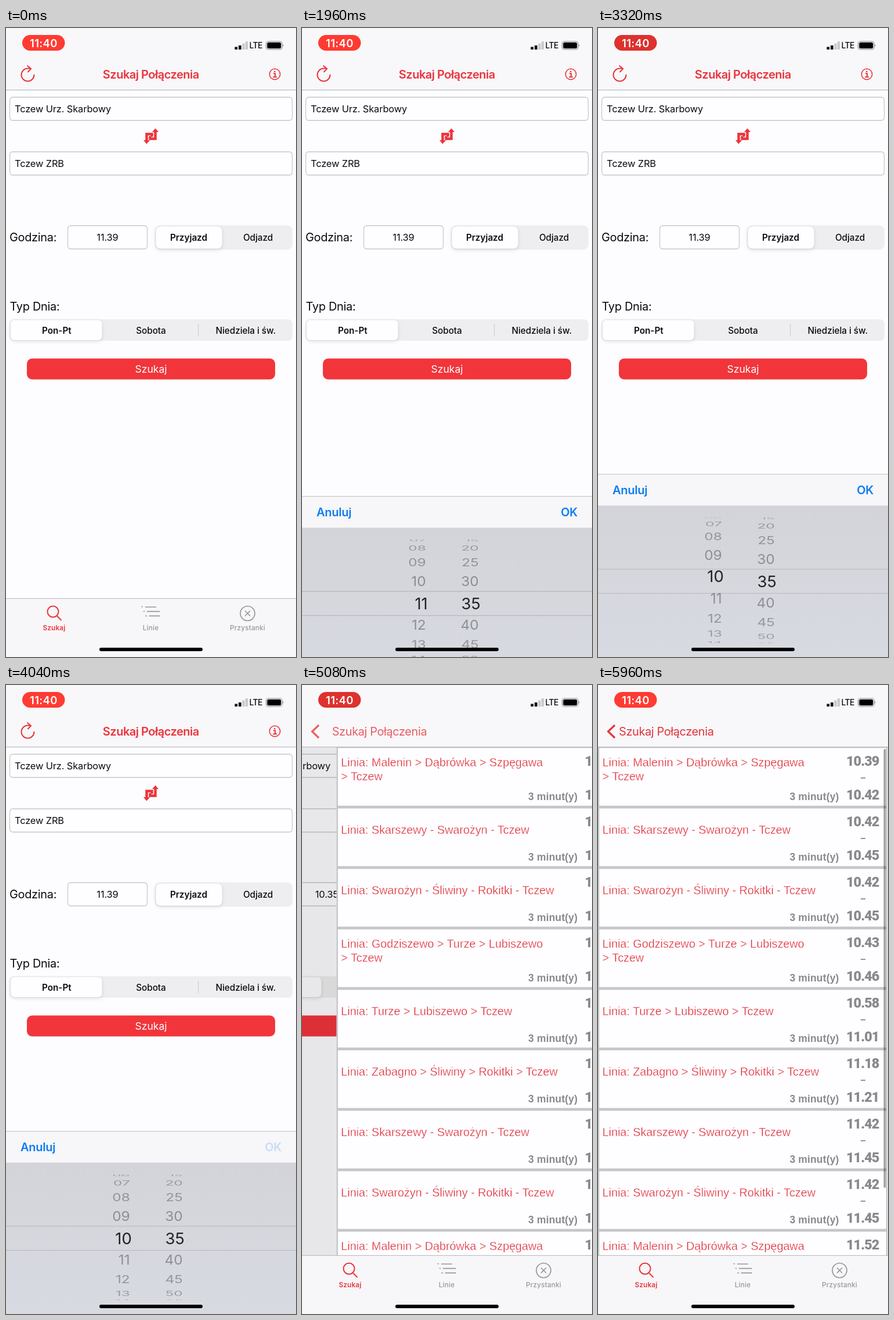
These frames come from a looping animation (500x1082 px, 6 s). An HTML page:

```html
<!DOCTYPE html>
<html lang="pl">
<head>
<meta charset="utf-8">
<title>Szukaj Połączenia</title>
<style>
  html, body { margin: 0; width: 100%; height: 100%; overflow: hidden; background: #fdfcfe; }
  svg { display: block; width: 100vw; height: 100vh; }
  text { font-family: Inter, sans-serif; fill: #0b0b0c; white-space: pre; }
  .mid { text-anchor: middle; }
  .end { text-anchor: end; }
  .field { fill: #fefdff; stroke: #c9c8cc; stroke-width: 1.3; }
  .input { font-size: 16.4px; letter-spacing: -.13px; }
  .label { font-size: 19.9px; letter-spacing: -.28px; }
  .track { fill: #eeedef; }
  .thumb { fill: #fefdff; filter: drop-shadow(0 2px 3px rgba(0,0,0,.13)); }
  .seg { font-size: 15.3px; font-weight: 500; letter-spacing: -.05px; text-anchor: middle; }
  .on { font-weight: 600; }
  .icon { fill: none; stroke: #e8353c; stroke-width: 2; }
  .gray { stroke: #97969a; stroke-width: 1.7; }
  .title { font-size: 20px; font-weight: 600; letter-spacing: -.5px; fill: #ea343c; }
  .back { font-size: 19.9px; letter-spacing: -.36px; fill: #e2343c; }
  .tab { font-size: 11.7px; font-weight: 500; letter-spacing: .22px; text-anchor: middle; fill: #97969a; }
  .tab.on { fill: #ea343c; font-weight: 600; }
  .action { font-size: 19.9px; font-weight: 600; letter-spacing: -.2px; fill: #0a7df2; }
  /* The pale outline thins the strokes to a light weight */
  .line { font: 19.75px "Liberation Sans", sans-serif; fill: #df2932; stroke: #fefdff; stroke-width: .4; }
  .time { font: 900 23.5px Roboto, sans-serif; letter-spacing: -1px; fill: #89888c; }
  .mins { font: 700 17.5px "Liberation Sans", sans-serif; letter-spacing: .15px; fill: #89888c; }
  .cell { fill: #fefdff; stroke: #c6c5c8; stroke-width: 2.4; }
</style>
</head>
<body>
<svg viewBox="0 0 500 1082" preserveAspectRatio="none">
  <defs>
    <clipPath id="band"><rect x="0" y="931" width="500" height="41"/></clipPath>
    <clipPath id="rest"><path d="M0 842H500V931H0ZM0 972H500V1058H0Z"/></clipPath>
    <linearGradient id="tray" x2="0" y2="1">
      <stop offset="0" stop-color="#d3d4d9"/><stop offset="1" stop-color="#d8dae2"/>
    </linearGradient>
  </defs>
  <rect width="500" height="1082" fill="#fdfcfe"/>

  <g id="form">
    <rect class="field" x="6.5" y="119" width="487" height="40" rx="5"/>
    <text class="input" x="15" y="144.5">Tczew Urz. Skarbowy</text>
    <g fill="#ea343c">
      <path d="M242.5 194V182.5H251.5V187M257.5 178V190.5H248.5V186" fill="none" stroke="#ea343c" stroke-width="4.4"/>
      <path d="M237 193H248L242.5 199.5ZM252 179H263L257.5 172.5Z"/>
    </g>
    <rect class="field" x="6.5" y="213" width="487" height="40" rx="5"/>
    <text class="input" x="15" y="238.7">Tczew ZRB</text>

    <text class="label" x="6" y="367">Godzina:</text>
    <rect class="field" x="106.5" y="340" width="137" height="40" rx="5"/>
    <text class="input mid" id="hour" x="175" y="365.5">11.39</text>
    <rect class="track" x="256.5" y="339.5" width="237.5" height="42" rx="9"/>
    <rect class="thumb" x="258.5" y="341.5" width="114" height="38" rx="8"/>
    <text class="seg on" x="315" y="366">Przyjazd</text>
    <text class="seg" x="434.5" y="366">Odjazd</text>

    <text class="label" x="6.5" y="485.5">Typ Dnia:</text>
    <rect class="track" x="6" y="501" width="488" height="37" rx="8"/>
    <rect id="divider" x="331" y="509" width="1.2" height="21" fill="#cfced2"/>
    <rect class="thumb" id="thumb" x="8" y="502.5" width="157.5" height="34.5" rx="7"/>
    <text class="seg" id="week" x="87.3" y="525.5">Pon-Pt</text>
    <text class="seg" id="sat" x="250" y="525.5">Sobota</text>
    <text class="seg" x="413.3" y="525.5">Niedziela i św.</text>

    <rect x="36" y="568.5" width="428" height="36" rx="9" fill="#f1353b"/>
    <text class="mid" id="search" x="250" y="593.3" style="font-size:17.6px;fill:#fff">Szukaj</text>
  </g>
  <rect id="dim" y="106" width="500" height="876" opacity="0"/>

  <g id="list">
    <rect y="106" width="500" height="976" fill="#fdfcfe"/>
    <g id="rows"></g>
    <rect id="bar" x="492.5" y="110" width="3.8" height="755" rx="1.9" opacity="0"/>
  </g>

  <rect width="500" height="106" fill="#f8f7f9"/>
  <rect y="106" width="500" height="1.2" fill="#bbbabd"/>
  <g id="tools">
    <path class="icon" d="M48.5 80A11 11 0 1 1 37.5 69.5H42M36.5 64.5L43 70L37.5 76"/>
    <circle class="icon" cx="463.5" cy="79.5" r="9.2" style="stroke-width:1.6"/>
    <path class="icon" d="M461 78.3H464V84M460.5 84.2H467M462 75H464.5"/>
  </g>
  <text class="title mid" id="title" x="249.8" y="87.3">Szukaj Połączenia</text>
  <g id="backLink">
    <path class="icon" d="M29 69L17.5 80L29 91" style="stroke-width:3.2"/>
    <text class="back" id="backText" x="36" y="87">Szukaj Połączenia</text>
  </g>

  <g>
    <rect y="981" width="500" height="101" fill="#f7f6f8"/>
    <rect y="980.8" width="500" height="1.2" fill="#bfbec1"/>
    <path class="icon" d="M87.8 1011.3L95.5 1019"/><circle class="icon" cx="81" cy="1004" r="9.5"/>
    <text class="tab on" x="83" y="1036">Szukaj</text>
    <path class="icon gray" d="M240 996H259M243 1003.7H265.5M246.5 1011.3H265.5M233.5 995.5H236M236.7 1003.5H239.2M240.2 1011.3H242.7"/>
    <text class="tab" x="249.5" y="1036">Linie</text>
    <circle class="icon gray" cx="416.5" cy="1007" r="12.5"/>
    <path class="icon gray" d="M412 1002.5L421 1011.5M421 1002.5L412 1011.5"/>
    <text class="tab" x="416.5" y="1036">Przystanki</text>
  </g>

  <g id="picker">
    <rect y="767" width="500" height="55" fill="#f7f6f8"/>
    <rect y="767" width="500" height="1.2" fill="#c8c7ca"/>
    <text class="action" x="25" y="802">Anuluj</text>
    <text class="action end" id="ok" x="475" y="802">OK</text>
    <rect y="821.5" width="500" height="261" fill="url(#tray)"/>
    <path d="M0 931H500M0 972.5H500" stroke="#b7b8bd" stroke-width="1.2"/>
    <g id="outer" clip-path="url(#rest)"></g>
    <g id="inner" clip-path="url(#band)"></g>
  </g>

  <rect id="pill" x="28" y="12" width="73.5" height="27" rx="13.5"/>
  <text class="mid" x="64.9" y="32.6" style="font-size:18.5px;font-weight:600;letter-spacing:.3px;fill:#fff">11:40</text>
  <path d="M394.5 32.5h4.6v4.5h-4.6zM401 30h4.6v7h-4.6z"/>
  <path d="M407.3 26.5h4.3v10.5h-4.3zM412.8 23h4.3v14h-4.3z" fill="#c9c8cb"/>
  <text x="419.5" y="35" style="font-size:14px;font-weight:500;letter-spacing:-.6px">LTE</text>
  <rect x="448.5" y="23" width="27.5" height="14" rx="4" fill="none" stroke="#8b8a8e" stroke-width="1.2"/>
  <rect x="450.3" y="24.8" width="23.9" height="10.4" rx="2.5"/>
  <path d="M477.3 27.5q2.4 2.5 0 5z" fill="#8b8a8e"/>
  <rect x="161" y="1066" width="178" height="6" rx="3"/>
</svg>
<script>
const LOOP = 6000, STEP = Math.PI / 9, RADIUS = 109.5, MIDDLE = 951.5;
const $ = id => document.getElementById(id);
const clamp = x => Math.max(0, Math.min(1, x));
const ramp = (t, from, length) => clamp((t - from) / length);
const smooth = x => x * x * (3 - 2 * x);
const mix = (a, b, p) => a + (b - a) * p;
const shift = (id, x, y) => $(id).setAttribute('transform', `translate(${x} ${y})`);
const fade = (id, value) => $(id).setAttribute('opacity', value);

// Critically damped spring from 0 to 1
function spring(t, from) {
  const x = Math.max(0, t - from) * 0.01826;
  return 1 - (1 + x) * Math.exp(-x);
}

// Label dims at once on touch and recovers on release
const pressed = (t, down, up) => t < down ? 1 : t < up ? .2 : mix(.2, 1, ramp(t, up, 200));

function add(parent, name, attrs, content = '') {
  const el = document.createElementNS('http://www.w3.org/2000/svg', name);
  for (const key in attrs) el.setAttribute(key, attrs[key]);
  el.textContent = content;
  return parent.appendChild(el);
}

const malenin = 'Malenin > Dąbrówka > Szpęgawa|> Tczew';
const skarszewy = 'Skarszewy - Swarożyn - Tczew';
const swarozyn = 'Swarożyn - Śliwiny - Rokitki - Tczew';
const trips = [
  [malenin, '10.39', '10.42'],
  [skarszewy, '10.42', '10.45'],
  [swarozyn, '10.42', '10.45'],
  ['Godziszewo > Turze > Lubiszewo|> Tczew', '10.43', '10.46'],
  ['Turze > Lubiszewo > Tczew', '10.58', '11.01'],
  ['Zabagno > Śliwiny > Rokitki > Tczew', '11.18', '11.21'],
  [skarszewy, '11.42', '11.45'],
  [swarozyn, '11.42', '11.45'],
  [malenin, '11.52', '11.55']
];
trips.forEach(([route, start, stop], i) => {
  const row = add($('rows'), 'g', { transform: `translate(0 ${106 + 104 * i})` });
  const put = (cls, x, y, s) => add(row, 'text', { class: cls, x, y }, s);
  add(row, 'rect', { class: 'cell', x: 1, y: 1.2, width: 497, height: 101.6 });
  const lines = ('Linia: ' + route).split('|');
  lines.forEach((s, n) => put('line', 7.6, (lines.length > 1 ? 34 : 46) + 24 * n, s));
  put('time end', 484.5, 32.5, start);
  add(row, 'rect', { x: 453, y: 53, width: 8, height: 1.8, fill: '#89888c' });
  put('time end', 484.5, 90.5, stop);
  put('mins end', 415.5, 91.5, '3 minut(y)');
});

// Right-aligned values on a cylinder, magnified inside the band
function wheel(right, format) {
  const make = (id, size, fill) => Array.from({ length: 11 }, () =>
    add($(id), 'text', { class: 'end', x: 0, y: size * .364, style: `font-size:${size}px;fill:${fill}` }));
  const small = make('outer', 24.5, '#000'), large = make('inner', 27.5, '#222225');
  return pos => {
    const base = Math.round(pos) - 5;
    small.forEach((el, i) => {
      const offset = base + i - pos, angle = offset * STEP, flat = Math.cos(angle);
      el.textContent = large[i].textContent = format(base + i);
      el.setAttribute('transform', `translate(${right} ${MIDDLE + RADIUS * Math.sin(angle)}) scale(1 ${Math.max(flat, .01)})`);
      el.setAttribute('opacity', Math.abs(angle) < 1.5 ? .2 + .14 * flat : 0);
      large[i].setAttribute('transform', `translate(${right + 3} ${MIDDLE + 41 * offset})`);
    });
  };
}
const pad = n => String(n).padStart(2, '0');
const hours = wheel(213.8, n => pad((n + 24) % 24));
const minutes = wheel(304.8, n => pad((n * 5 + 60) % 60));
minutes(7);

function render(t) {
  const glow = clamp(.5 + .7 * Math.cos((t - 100) / 1000 * Math.PI));
  $('pill').setAttribute('fill', `rgb(${mix(221, 255, glow)} ${mix(50, 59, glow)} ${mix(46, 50, glow)})`);

  const day = spring(t, 300) - spring(t, 1112);
  const saturday = t >= 300 && t < 1112;
  shift('thumb', 163 * day, 0);
  $('week').classList.toggle('on', !saturday);
  $('sat').classList.toggle('on', saturday);
  fade('divider', 1 - ramp(t, 300, 150) + ramp(t, 1112, 150));

  shift('picker', 0, 320 * (1 - spring(t, 1760) + spring(t, 4120)));
  hours(11 - smooth(ramp(t, 2760, 800)));
  fade('ok', pressed(t, 3880, 4120));
  $('hour').textContent = t < 4120 ? '11.39' : '10.35';

  fade('search', pressed(t, 4640, 4800));
  const push = spring(t, 4880);
  shift('form', -150 * push, 0);
  fade('dim', .1 * push);
  shift('list', 502 * (1 - push), 0);
  shift('title', -132 * push, 0);
  fade('title', clamp(1 - push * 1.8));
  fade('tools', clamp(1 - push * 1.8));
  shift('backText', 132 * (1 - push), 0);
  fade('backLink', clamp(push * 1.8 - .8));
  fade('bar', .36 * ramp(t, 5400, 120));
}

function tick(now) {
  render(now % LOOP);
  requestAnimationFrame(tick);
}
render(0);
requestAnimationFrame(tick);
</script>
</body>
</html>
```
